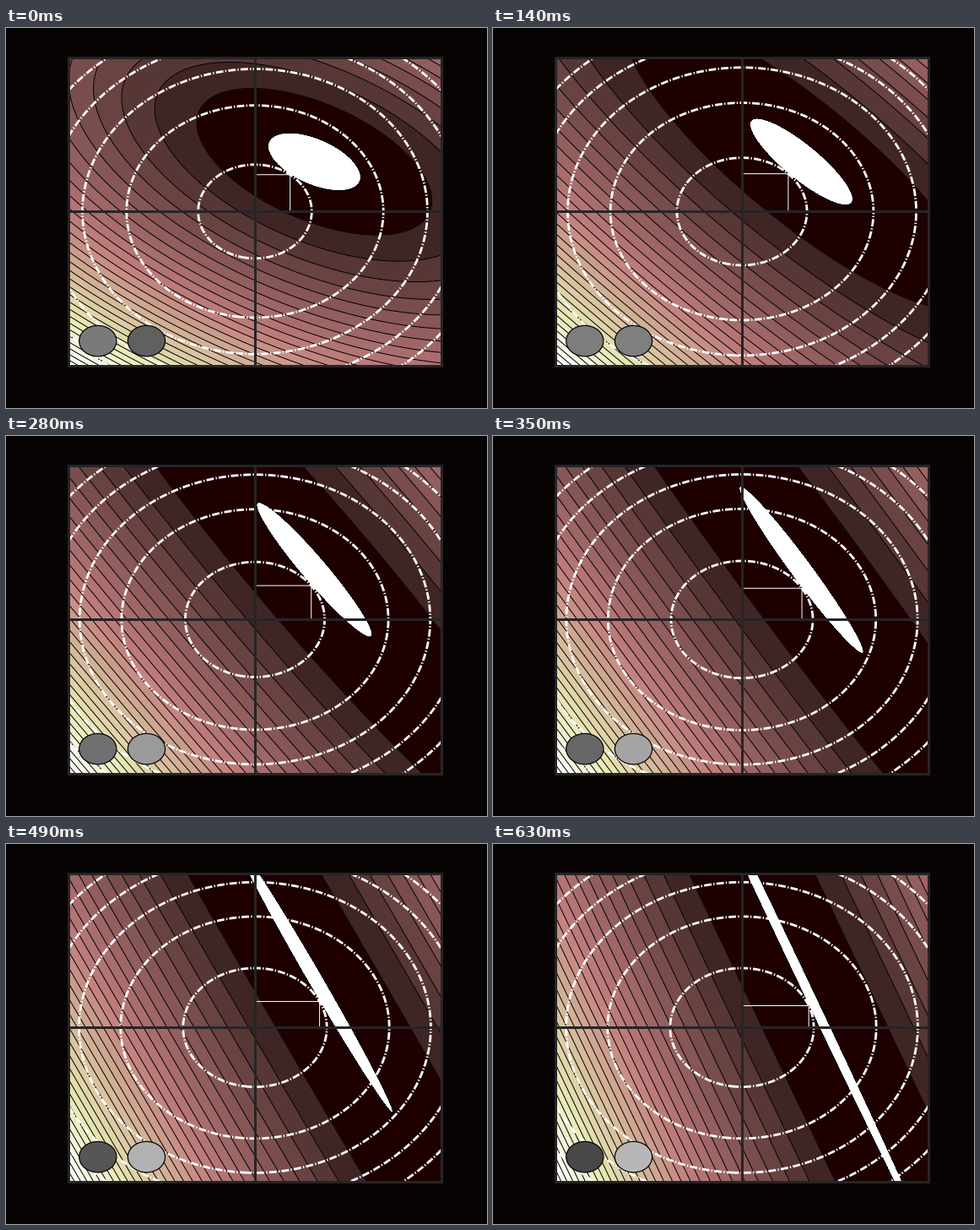
Recreate the animation shown at these times as a matplotlib script. Size 570x450 px, loop 0.7 s.

```python
import numpy as np
import matplotlib.pyplot as plt
from matplotlib.animation import FuncAnimation
from matplotlib.patches import Circle

W, H, DPI = 570, 450, 100
PX = 72 / DPI                    # one pixel in points
FRAMES, STEP_MS = 10, 70
LIM = 2.0
LEFT, RIGHT, TOP, BOTTOM = 74, 516, 34.8, 399.8
RIDGE = 0.57
W_TRUE = np.array([0.637, 0.646])
BACK, AXIS = "#080303", "#252527"
RING_WIDTH = 2.0
DASH_DOT = [d / RING_WIDTH for d in (6.4, 1.6, 1.0, 1.6)]

grid = np.linspace(-LIM, LIM, 241)
U, V = np.meshgrid(grid, grid)
NORM2 = U**2 + V**2

fig = plt.figure(figsize=(W / DPI, H / DPI), dpi=DPI, facecolor=BACK)
ax = fig.add_axes([LEFT / W, 1 - BOTTOM / H, (RIGHT - LEFT) / W, (BOTTOM - TOP) / H])


def gram(i):
    """Gram matrix of a two-row design whose rows grow collinear."""
    X = np.array([[0.717, 0.24], [0.245 * (i + 0.96), 0.971]])
    return X.T @ X


def loss(A, u, v):
    du, dv = u - W_TRUE[0], v - W_TRUE[1]
    return A[0, 0] * du**2 + 2 * A[0, 1] * du * dv + A[1, 1] * dv**2


def draw(i):
    A = gram(i)
    w = np.linalg.solve(A + RIDGE * np.eye(2), A @ W_TRUE)
    Z = loss(A, U, V)
    levels = np.linspace(loss(A, *w), Z.max(), 31)
    mids = (levels[1:] + levels[:-1]) / 2
    rings = np.linspace(w @ w, NORM2.max(), 6)

    ax.clear()
    ax.set(xlim=(-LIM, LIM), ylim=(-LIM, LIM), xticks=[], yticks=[], facecolor="white")
    ax.contourf(U, V, Z, levels, cmap="pink", vmin=mids[0], vmax=mids[-1], zorder=1)
    ax.contour(U, V, Z, levels, colors="black", linewidths=1.0 * PX, zorder=1.5)
    circles = ax.contour(U, V, NORM2, rings, colors="white",
                         linewidths=RING_WIDTH, zorder=2)
    circles.set_linestyle((0, DASH_DOT))
    ax.plot([0, w[0], w[0]], [w[1], w[1], 0], color="white", lw=1.0 * PX,
            snap=False, zorder=2.5)
    ax.axhline(0, color=AXIS, lw=3 * PX, zorder=3)
    ax.axvline(0, color=AXIS, lw=3 * PX, zorder=3)
    for x, weight in ((-1.685, w[1]), (-1.163, w[0])):
        ax.add_patch(Circle((x, -1.68), 0.2, facecolor=str(round(weight, 4)),
                            edgecolor="black", lw=1.2 * PX, zorder=4))
    for spine in ax.spines.values():
        spine.set(color=AXIS, linewidth=3 * PX, zorder=5)
    return []


anim = FuncAnimation(fig, draw, frames=FRAMES, init_func=lambda: draw(0),
                     interval=STEP_MS, repeat=True, repeat_delay=0)
plt.show()
```
